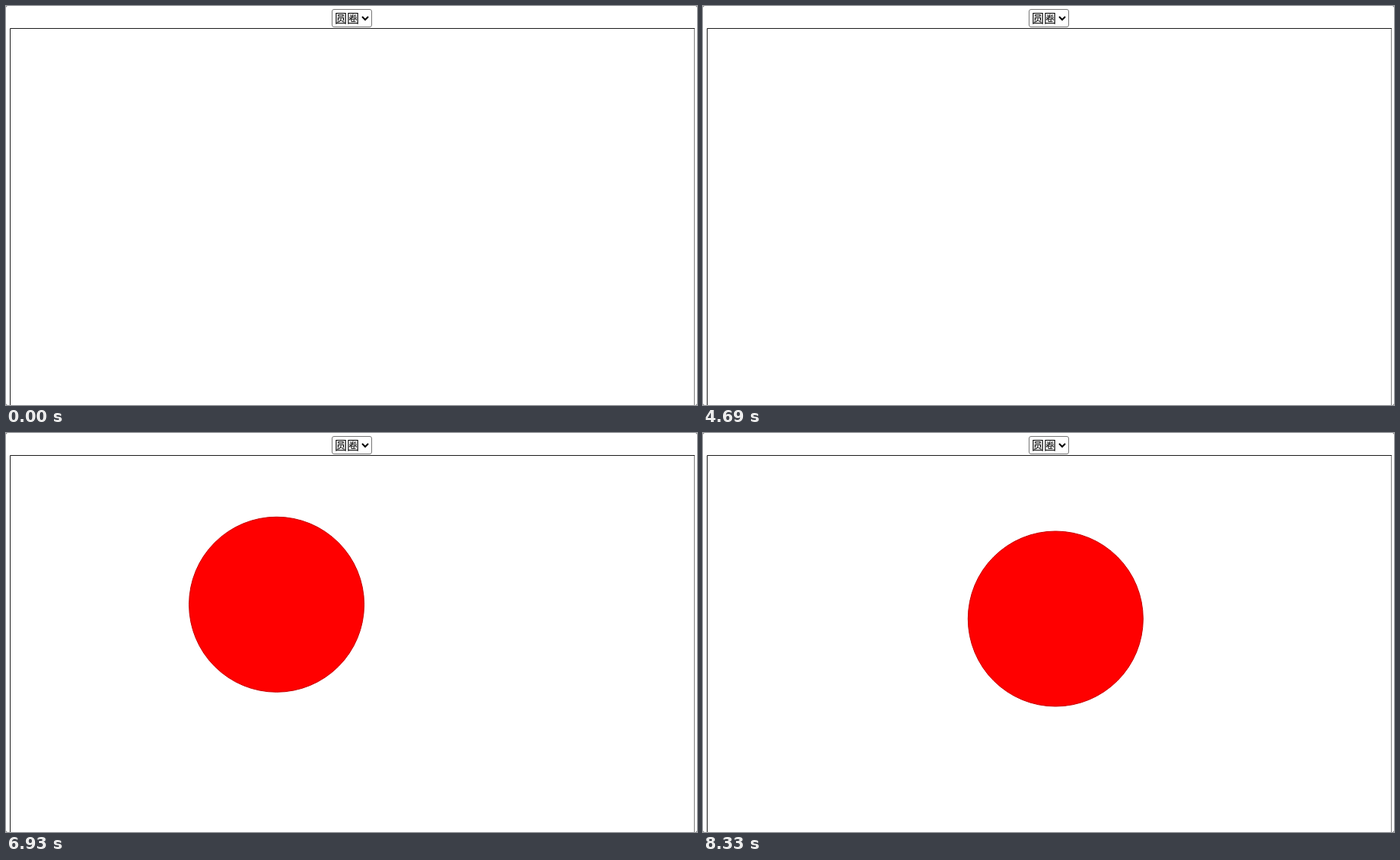
Animation, 908 px wide and 524 px high, one loop 9.73 s. Source, as an HTML page:

```html
<!DOCTYPE html>
<html lang="zh">
<head>
<meta charset="utf-8">
<title>圆圈</title>
<style>
  html, body { margin: 0; width: 100%; height: 100%; overflow: hidden; background: #fff; }
  svg { display: block; width: 908px; height: 524px; }
  text { font: 16px "Noto Sans CJK SC", "Noto Sans CJK", sans-serif; }
  #panel { filter: drop-shadow(0 3px 5px rgba(0, 0, 0, .2)); }
</style>
</head>
<body>
<svg viewBox="0 0 908 524">
  <rect width="908" height="524" fill="#666"/>
  <rect width="908" height="524" rx="2.5" fill="#fff"/>
  <path d="M5.5 524V29.5H905" fill="none" stroke="#1c1c1c"/>
  <path d="M904.5 30V524" stroke="#7c7c7c"/>

  <rect id="box" fill="#fff"/>
  <text x="432" y="22">圆圈</text>
  <path d="M468 14l4 4 4-4" fill="none" stroke="#000" stroke-width="2"/>

  <circle id="outline" cx="406" cy="172.2" fill="none" stroke="#8b0000" stroke-width="2" stroke-dasharray="2 2"/>
  <circle id="disc" r="115" fill="#f00" stroke="#c80000"/>

  <g id="menu">
    <rect id="panel" x="419.5" y="-10" width="74" height="97.5" rx="6" fill="#e8eaec" stroke="#bcbec0"/>
    <rect x="425" y="4" width="63" height="26" rx="4" fill="#4a9bff"/>
    <path d="M430.5 18l2.8 3.5 5-8" fill="none" stroke="#fff" stroke-width="1.8" stroke-linecap="round" stroke-linejoin="round"/>
    <text x="444" y="22.5" fill="#fff" font-weight="500" style="font-weight:500">圆圈</text>
    <text x="444" y="48.5">直线</text>
    <text x="444" y="74.5">标签</text>
  </g>
</svg>
<script>
const LOOP = 9730, STEP = 70;
const el = id => document.getElementById(id);
const [box, outline, disc, menu] = ["box", "outline", "disc", "menu"].map(el);

function set(node, attrs) {
  for (const key in attrs) node.setAttribute(key, attrs[key]);
}
const show = (node, on) => set(node, { visibility: on ? "visible" : "hidden" });

// Drag path: time, centre x, centre y
const drag = [
  [6580, 406, 172], [6650, 389.5, 172], [6720, 370, 177], [6860, 355, 204],
  [7000, 362, 250], [7140, 394, 305], [7280, 447, 337], [7350, 465, 338.3],
  [7420, 479, 330], [7560, 492.8, 297], [7700, 497.9, 262], [7840, 489, 240],
  [7980, 475, 236.2], [8120, 467, 239], [8330, 463.3, 244]
];

// Cubic Hermite curve through the drag points
function along(t) {
  const last = drag.length - 1;
  if (t <= drag[0][0]) return drag[0].slice(1);
  if (t >= drag[last][0]) return drag[last].slice(1);
  const i = drag.findIndex(p => p[0] > t) - 1;
  const a = drag[i], b = drag[i + 1];
  const before = drag[Math.max(i - 1, 0)], after = drag[Math.min(i + 2, last)];
  const span = b[0] - a[0], u = (t - a[0]) / span;
  return [1, 2].map(k => {
    const m0 = (b[k] - before[k]) / (b[0] - before[0]) * span;
    const m1 = (after[k] - a[k]) / (after[0] - a[0]) * span;
    const d = b[k] - a[k];
    return a[k] + u * (m0 + u * (3 * d - 2 * m0 - m1 + u * (m0 + m1 - 2 * d)));
  });
}

function radius(t) {
  if (t < 5810) {
    const u = Math.min((t - 4830) / 630, 1);
    return 108 * (1 - Math.cos(Math.PI * u)) / 2;
  }
  return t < 5880 ? 112 : 116;
}

function draw(now) {
  const time = now % LOOP;
  const t = Math.floor(time / STEP) * STEP;

  const focused = t >= 2030 && t < 4690;
  set(box, focused
    ? { x: 429, y: 5, width: 51, height: 22, rx: 3, stroke: "#0b5cad", "stroke-width": 2 }
    : { x: 428.5, y: 4.5, width: 52, height: 23, rx: 2.5, stroke: "#767676", "stroke-width": 1 });

  show(menu, t >= 2030 && t < 3430);
  set(menu, { opacity: t < 3080 ? 1 : (3430 - t) / 420 });

  const sizing = t >= 4900 && t < 5950;
  show(outline, sizing);
  if (sizing) set(outline, { r: radius(t) });

  show(disc, t >= 5950);
  const [cx, cy] = along(t);
  set(disc, { cx, cy });
}

let start;
function tick(now) {
  start ??= now;
  draw(now - start);
  requestAnimationFrame(tick);
}
draw(0);
requestAnimationFrame(tick);
</script>
</body>
</html>
```
